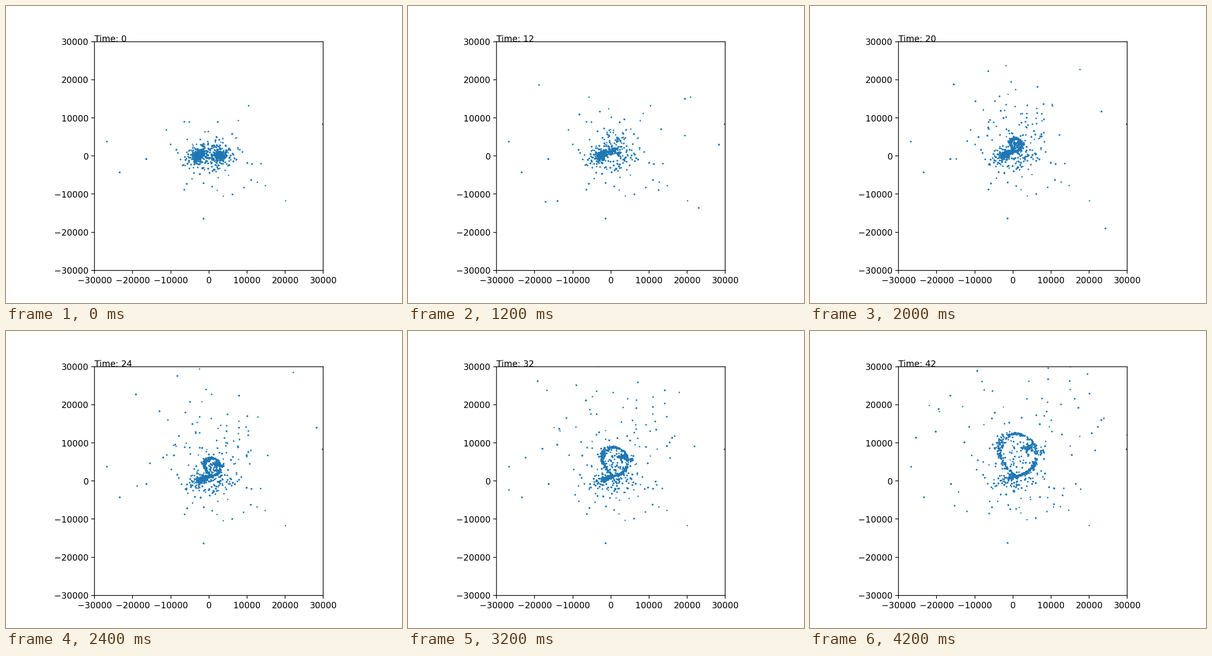
These frames come from a looping animation (864x648 px, 4300 ms). A matplotlib script:

```python
import numpy as np
import matplotlib.pyplot as plt
from matplotlib.animation import FuncAnimation

FRAMES, STEP = 43, 100
DPI = 135
SCALE = 498.96 / 60000            # pixels per data unit
MID = np.array([442.8, 327.24])   # pixel position of the data origin
CORE = np.array([448.0, 317.0])   # where infalling stars meet
GRAVITY = 40.0                    # pixels^3 per step^2
LEFT, RIGHT = (420.5, 325.5), (465.5, 326.0)
TURN = 2 * np.pi
UP = -np.pi / 2

# The few lone stars far from both clusters, in pixels.
FAR = [(220, 296), (248, 363), (306, 334), (431, 464), (566, 392),
       (610, 425), (691, 258), (507, 250), (400, 253), (462, 253)]

rng = np.random.default_rng(11)
groups = []   # tuples of start, time at core, exit velocity, infall power


def add(start, born, vel, power):
    groups.append((start, born, vel, np.full(len(start), float(power))))


def polar(angle, length):
    return np.c_[np.cos(angle), np.sin(angle)] * np.reshape(length, (-1, 1))


def cluster(center, n):
    """Dense core with a loose tail."""
    spread = rng.choice([4.5, 8, 15], (n, 1), p=[0.5, 0.33, 0.17])
    return center + rng.normal(size=(n, 2)) * spread * [1.1, 0.95]


def either_cluster(n, right=0.6):
    pick = rng.random((n, 1)) < right
    return np.where(pick, cluster(RIGHT, n), cluster(LEFT, n))


def add_drifting(start):
    """Stars falling slowly; the closest ones pass the core and leave."""
    start = np.asarray(start, float)
    n = len(start)
    r = np.hypot(*(start - CORE).T)
    born = np.maximum(np.sqrt(2 * r**3 / GRAVITY), 9)
    vel = polar(rng.uniform(0, TURN, n), rng.uniform(0.8, 3.2, n)) - [0, 0.9]
    add(start, born, vel, 2)


def add_flung(n, born, speed, fan):
    """Stars thrown out of the core in a fan around straight up."""
    vel = polar(UP + rng.normal(0, fan, n), rng.uniform(*speed, n))
    add(either_cluster(n), rng.uniform(*born, n), vel, 3)


def loop(theta):
    """Teardrop through the core, as offsets at the last step."""
    dx = 46 * np.sin(theta)
    dx = np.where(dx < 0, dx * 0.97 * np.abs(np.sin(theta / 2))**0.85, dx)
    return np.c_[dx, -46.5 * (1 - np.cos(theta))]


def add_bubble(offset, blur):
    n = len(offset)
    born = rng.normal(10.6, 0.35, n)
    offset = offset + rng.normal(0, blur, (n, 2))
    add(either_cluster(n, 0.65), born, offset / 31.5, 3)


def add_arc(lo, hi, n, blur):
    add_bubble(loop(rng.uniform(lo, hi, n)), blur)


def add_clump(offset, n, blur):
    add_bubble(np.tile(np.array(offset, float), (n, 1)), blur)


def add_stream(n):
    """The left cluster is drawn through the core, nearest stars first."""
    start = cluster(LEFT, n)
    lag = np.maximum(442 - start[:, 0], 0)
    start[:, 1] += 0.35 * (lag - 21)
    born = 11 + 1.15 * lag + rng.normal(0, 1.5, n)
    lift = 0.28 + 0.47 * np.clip(1 - (born - 11) / 22, 0, 1)
    vel = np.c_[np.full(n, 1.3), -lift] + rng.normal(0, 0.06, (n, 2))
    add(start, born, vel, 2)


add_drifting(FAR)
add_drifting(MID + polar(rng.uniform(0, TURN, 75),
                         26 + rng.exponential(24, 75)) * [1.1, 0.95])
add_drifting(either_cluster(75) + rng.normal(0, 16, (75, 2)))

add_flung(14, (1, 7), (11, 28), 1.6)     # early and fast
add_flung(14, (4, 9), (8, 12), 0.8)
add_flung(46, (5, 11), (3.6, 8), 0.72)   # main fan
add_flung(30, (8, 18), (2.2, 5.5), 1.7)  # slow, nearly all directions

add_arc(2.6, 3.5, 60, 0.9)               # crisp crest
add_arc(3.5, TURN - 1.5, 85, 5)          # ragged left shoulder
add_arc(TURN - 1.5, TURN, 50, 1.4)       # straight left edge
add_arc(0.3, 1.4, 55, 2)                 # lower right edge
add_arc(1.4, 2.6, 30, 1.8)               # upper right edge
add_clump((27, -62), 60, 6)              # knot
add_clump((58, -52), 12, 4.5)            # outer spur
add_clump((0, -47), 26, 17)              # interior
add_stream(210)

start, born, vel, power = (np.concatenate(part) for part in zip(*groups))
diameter = (2.6 + 1.7 * np.sqrt(rng.random(len(start)))) * 72 / DPI


def positions(t):
    fall = np.minimum(t / born, 1)**power
    out = np.maximum(t - born, 0)
    px = start + (CORE - start) * fall[:, None] + vel * out[:, None]
    return (px - MID) / SCALE * [1, -1]


fig, ax = plt.subplots(figsize=(864 / DPI, 648 / DPI), dpi=DPI)
ax.set_aspect("equal")
ax.set_xlim(-30000, 30000)
ax.set_ylim(-30000, 30000)
ticks = np.arange(-30000, 30001, 10000)
ax.set_xticks(ticks)
ax.set_yticks(ticks)
stars = ax.scatter(*positions(0).T, s=diameter**2, c="C0", linewidths=0)
label = ax.text(-30000, 30000, "Time: 0")


def draw(t):
    stars.set_offsets(positions(t))
    label.set_text(f"Time: {t}")
    return stars, label


anim = FuncAnimation(fig, draw, frames=FRAMES, interval=STEP, repeat=True,
                     repeat_delay=0)
plt.show()
```
